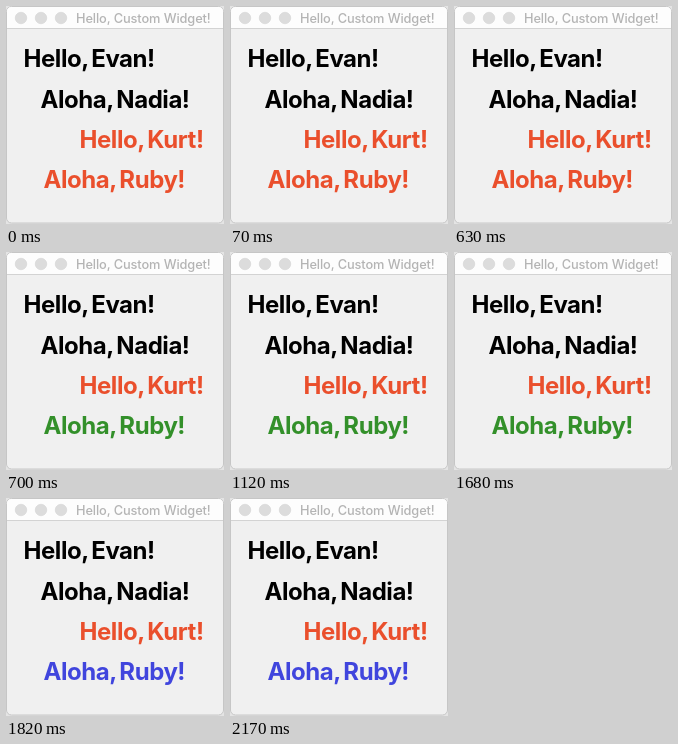
An HTML page for the animation above (2520 ms loop, 218 by 218 pixels).

```html
<!DOCTYPE html>
<html lang="en">
<head>
<meta charset="utf-8">
<title>Hello, Custom Widget!</title>
<style>
  html, body { margin: 0; width: 100%; height: 100%; overflow: hidden; background: #e4e4e4; }
  svg { display: block; width: 218px; height: 218px; }
  text { font-family: Inter, sans-serif; }
  .title { font-size: 12.8px; font-weight: 500; fill: #b4b4b4; letter-spacing: -.1px; }
  .greeting { font-size: 24px; font-weight: 700; letter-spacing: -.45px; word-spacing: -2px; }
  .accent { fill: #ea4f2c; }
</style>
</head>
<body>
<svg viewBox="0 0 218 218">
  <rect x=".5" y=".5" width="217" height="216.500" rx="5" fill="#f0f0f0" stroke="#c6c6c6"/>
  <path d="M1 22V5.500Q1 1 5.500 1H212.500Q217 1 217 5.500V22Z" fill="#fdfdfd"/>
  <path d="M1 22.500H217" stroke="#d3d3d3"/>
  <g fill="#dcdcdc" stroke="#d0d0d0" stroke-width=".5">
    <circle cx="15" cy="12" r="5.800"/>
    <circle cx="35" cy="12" r="5.800"/>
    <circle cx="55" cy="12" r="5.800"/>
  </g>
  <text class="title" x="70" y="17">Hello, Custom Widget!</text>
  <g class="greeting">
    <text x="17.500" y="61">Hello, Evan!</text>
    <text x="34.500" y="102">Aloha, Nadia!</text>
    <text class="accent" x="73.500" y="142">Hello, Kurt!</text>
    <text class="accent" id="cycling" x="37.500" y="182">Aloha, Ruby!</text>
  </g>
</svg>
<script>
  const LOOP = 2520;
  const steps = [[0, '#ea4f2c'], [700, '#33902a'], [1750, '#4045dd']];

  const keyframes = steps.map(([time, fill]) => ({
    offset: time / LOOP, fill, easing: 'step-end'
  }));
  keyframes.push({ offset: 1, fill: steps.at(-1)[1] });

  document.getElementById('cycling').animate(keyframes, {
    duration: LOOP, iterations: Infinity
  });
</script>
</body>
</html>
```
